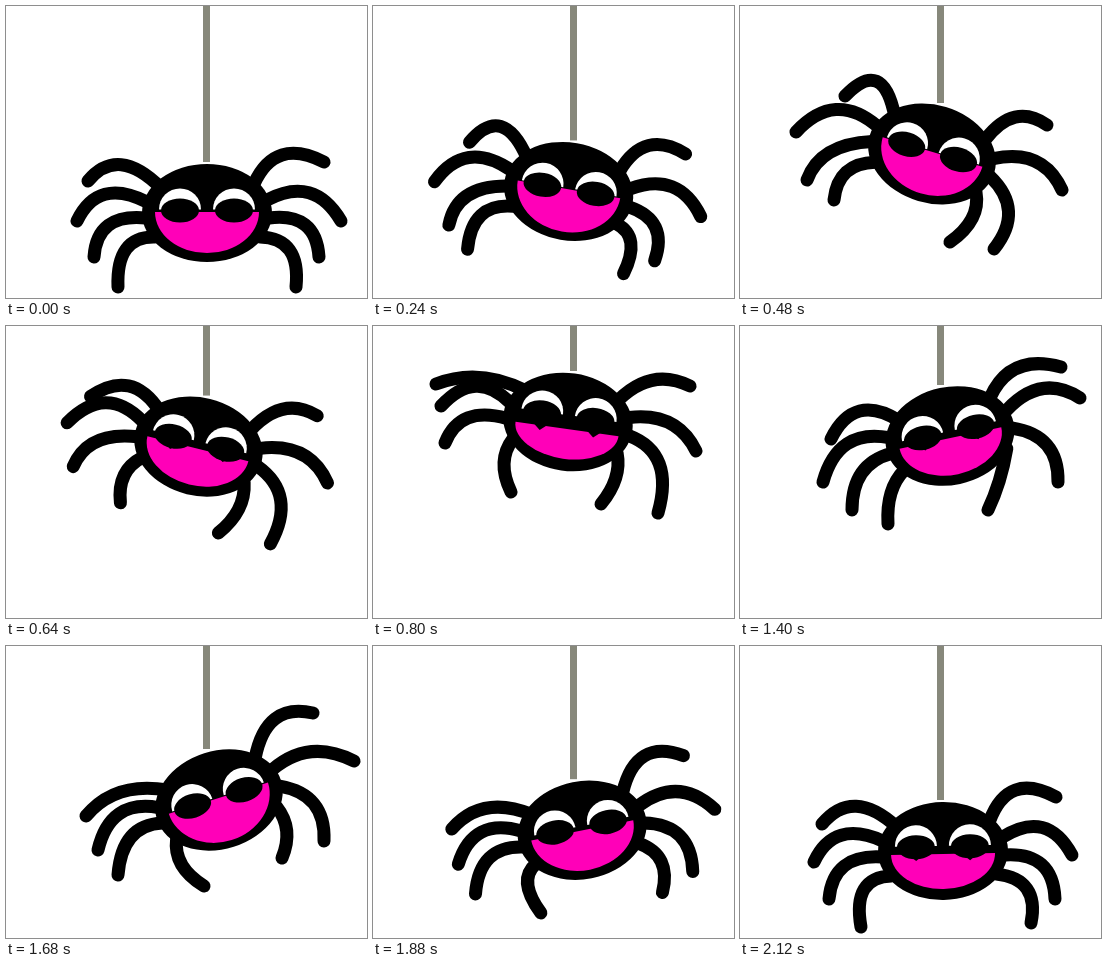
An HTML page with a canvas that plays this animation: 361 px wide and 292 px high, repeating every 2.16 s.

```html
<!DOCTYPE html>
<html lang="en">
<head>
<meta charset="utf-8">
<title>Dangling spider</title>
<style>
  html, body { margin: 0; width: 100%; height: 100%; overflow: hidden; background: #fff; }
  canvas { display: block; }
</style>
</head>
<body>
<canvas id="stage" width="361" height="292"></canvas>
<script>
const ctx = document.getElementById('stage').getContext('2d');
const LOOP = 2160, STEP = 40;
const PINK = '#ff00b8', THREAD = '#87887b';

// Hips relative to the body centre: four left, four right, top to bottom.
const hips = [[-46, -25], [-60, -11], [-61, 5], [-52, 24],
              [47, -29], [60, -13], [62, 5], [53, 24]];

// body: x, y, tilt, mouth line, mouth depth. legs: knee x, y, foot x, y.
const poses = [];
const pose = (time, body, left, right) =>
  poses.push({ time, values: [...body, ...left, ...right] });

pose(0, [201, 207, 0, -1, 41],
  [112, 139, 82, 175, 92, 171, 71, 215, 91, 207, 88, 251, 110, 230, 112, 281],
  [269, 131, 318, 156, 308, 169, 335, 215, 310, 206, 313, 251, 295, 232, 290, 281]);
pose(480, [192, 148, 16.5, -2, 43],
  [143, 50, 105, 90, 95, 84, 56, 126, 80, 138, 67, 174, 98, 157, 94, 194],
  [274, 96, 307, 119, 303, 142, 322, 184, 285, 204, 254, 243, 241, 214, 210, 236]);
pose(800, [195, 96, 8, 7, 30],
  [106, 41, 63, 58, 103, 42, 68, 80, 87, 79, 72, 117, 123, 135, 138, 166],
  [279, 41, 317, 60, 304, 86, 323, 125, 302, 127, 285, 187, 249, 152, 228, 178]);
pose(1120, [204, 82, -3, 8, 28],
  [117, 28, 81, 53, 88, 72, 68, 118, 99, 94, 91, 145, 101, 106, 140, 153],
  [270, 12, 319, 38, 300, 36, 329, 73, 314, 91, 314, 146, 288, 123, 266, 155]);
pose(1400, [210, 110, -12, 2, 37],
  [114, 66, 91, 113, 98, 102, 83, 156, 112, 138, 112, 184, 146, 163, 148, 198],
  [270, 27, 321, 41, 301, 47, 340, 72, 319, 109, 318, 156, 261, 157, 248, 184]);
pose(1680, [213, 154, -17.5, -2, 44],
  [109, 135, 80, 170, 104, 153, 92, 204, 116, 179, 112, 229, 167, 221, 198, 240],
  [260, 56, 307, 67, 303, 92, 348, 115, 320, 148, 318, 195, 288, 183, 276, 212]);
pose(2120, [203, 205, -1, 3, 35],
  [113, 141, 82, 178, 94, 173, 74, 216, 93, 208, 89, 253, 112, 231, 121, 281],
  [268, 125, 316, 151, 307, 163, 332, 209, 313, 206, 315, 253, 300, 233, 291, 277]);

const last = poses.length - 1;

function slope(i, k) {
  // The two poses around the seam share one wide slope.
  const a = i === 0 ? last - 1 : i - 1;
  const b = i === last ? 1 : i + 1;
  const span = (poses[b].time - poses[a].time + LOOP) % LOOP;
  return (poses[b].values[k] - poses[a].values[k]) / span;
}

function sample(t) {
  let i = last;
  while (poses[i].time > t) i--;
  const j = (i + 1) % poses.length;
  const from = poses[i], to = poses[j];
  const span = (to.time - from.time + LOOP) % LOOP;
  const u = (t - from.time) / span, u2 = u * u, u3 = u2 * u;
  return from.values.map((v, k) =>
    v * (2 * u3 - 3 * u2 + 1) + to.values[k] * (3 * u2 - 2 * u3) +
    span * (slope(i, k) * (u3 - 2 * u2 + u) + slope(j, k) * (u3 - u2)));
}

function oval(x, y, rx, ry, color, start = 0, end = Math.PI * 2) {
  ctx.fillStyle = color;
  ctx.beginPath();
  ctx.ellipse(x, y, rx, ry, 0, start, end);
  ctx.fill();
}

function drawLegs(x, y, angle, legs) {
  const c = Math.cos(angle), s = Math.sin(angle);
  ctx.strokeStyle = '#000';
  ctx.lineWidth = 13;
  ctx.lineCap = 'round';
  hips.forEach(([hx, hy], i) => {
    ctx.beginPath();
    ctx.moveTo(x + hx * c - hy * s, y + hx * s + hy * c);
    ctx.quadraticCurveTo(...legs.slice(i * 4, i * 4 + 4));
    ctx.stroke();
  });
}

function drawBody(x, y, angle, line, depth) {
  ctx.save();
  ctx.translate(x, y);
  ctx.rotate(angle);
  oval(0, 0, 65, 49, '#000');
  oval(0, line, 52, depth, PINK, 0, Math.PI);

  const fang = 8 - line * 0.45, eyeY = -4 - line * 0.4;
  for (const ex of [-27, 27]) {
    oval(ex, eyeY, 21, 21, '#fff', Math.PI, 0);
    oval(ex, eyeY + 1, 19, 12, '#000');
    ctx.beginPath();
    ctx.moveTo(ex - fang * 1.4, line - 1);
    ctx.lineTo(ex + fang * 1.4, line - 1);
    ctx.lineTo(ex, line + fang);
    ctx.fill();
  }
  ctx.restore();
}

function draw(t) {
  const [x, y, tilt, line, depth, ...legs] = sample(t);
  const angle = tilt * Math.PI / 180;
  ctx.fillStyle = '#fff';
  ctx.fillRect(0, 0, 361, 292);
  ctx.fillStyle = THREAD;
  ctx.fillRect(197, 0, 7, y - 51);
  drawLegs(x, y, angle, legs);
  drawBody(x, y, angle, line, depth);
}

const begin = performance.now();
function tick() {
  const t = (performance.now() - begin) % LOOP;
  draw(Math.floor(t / STEP) * STEP);
  requestAnimationFrame(tick);
}
tick();
</script>
</body>
</html>
```
